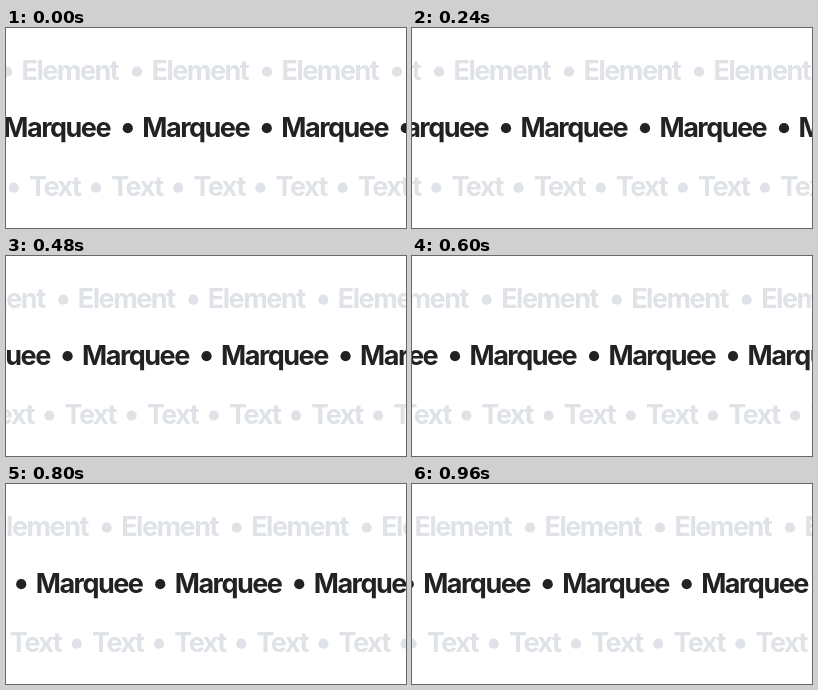
Write an HTML page with a canvas that moves like this. It is 400 px wide and 200 px high and loops after 1000 ms.

```html
<!DOCTYPE html>
<html lang="en">
<head>
<meta charset="utf-8">
<style>
  html, body { margin: 0; width: 100%; height: 100%; overflow: hidden; background: #fff; }
  canvas { display: block; }
</style>
</head>
<body>
<canvas id="stage" width="400" height="200"></canvas>
<script>
const ctx = document.getElementById('stage').getContext('2d');
const LOOP = 1000, TICK = 40, STEPS = 30;

// x: left edge of the first word, dot: bullet centre relative to it
const rows = [
  { word: 'Element', x: 15.5, y: 52, gap: 130, dot: 115.5, dir: 1, color: '#dfe2e7' },
  { word: 'Marquee', x: -2.7, y: 108.5, gap: 139, dot: 124.5, dir: -1, color: '#222224' },
  { word: 'Text', x: 23, y: 168, gap: 82.2, dot: 67, dir: 1, color: '#dfe2e7' }
];

// 25 ticks cover 30 steps: some ticks skip a step
function stepAt(time) {
  const tick = Math.floor((time % LOOP) / TICK);
  const skipped = Math.max(0, Math.min(3, Math.floor(tick / 5) - 1));
  return tick + skipped;
}

function drawRow(row, progress) {
  const shift = row.x + row.dir * row.gap * progress;
  const start = ((shift % row.gap) + row.gap) % row.gap - 2 * row.gap;
  ctx.fillStyle = row.color;
  for (let x = start; x < 400; x += row.gap) {
    ctx.fillText(row.word, x, row.y);
    ctx.beginPath();
    ctx.arc(x + row.dot, row.y - 8.3, 5.1, 0, Math.PI * 2);
    ctx.fill();
  }
}

function draw(now) {
  const progress = stepAt(now) / STEPS;
  ctx.fillStyle = '#fff';
  ctx.fillRect(0, 0, 400, 200);
  ctx.font = '700 27px Inter, sans-serif';
  ctx.letterSpacing = '-1.5px';
  rows.forEach(row => drawRow(row, progress));
}

function loop() {
  draw(performance.now());
  requestAnimationFrame(loop);
}
loop();
</script>
</body>
</html>
```
